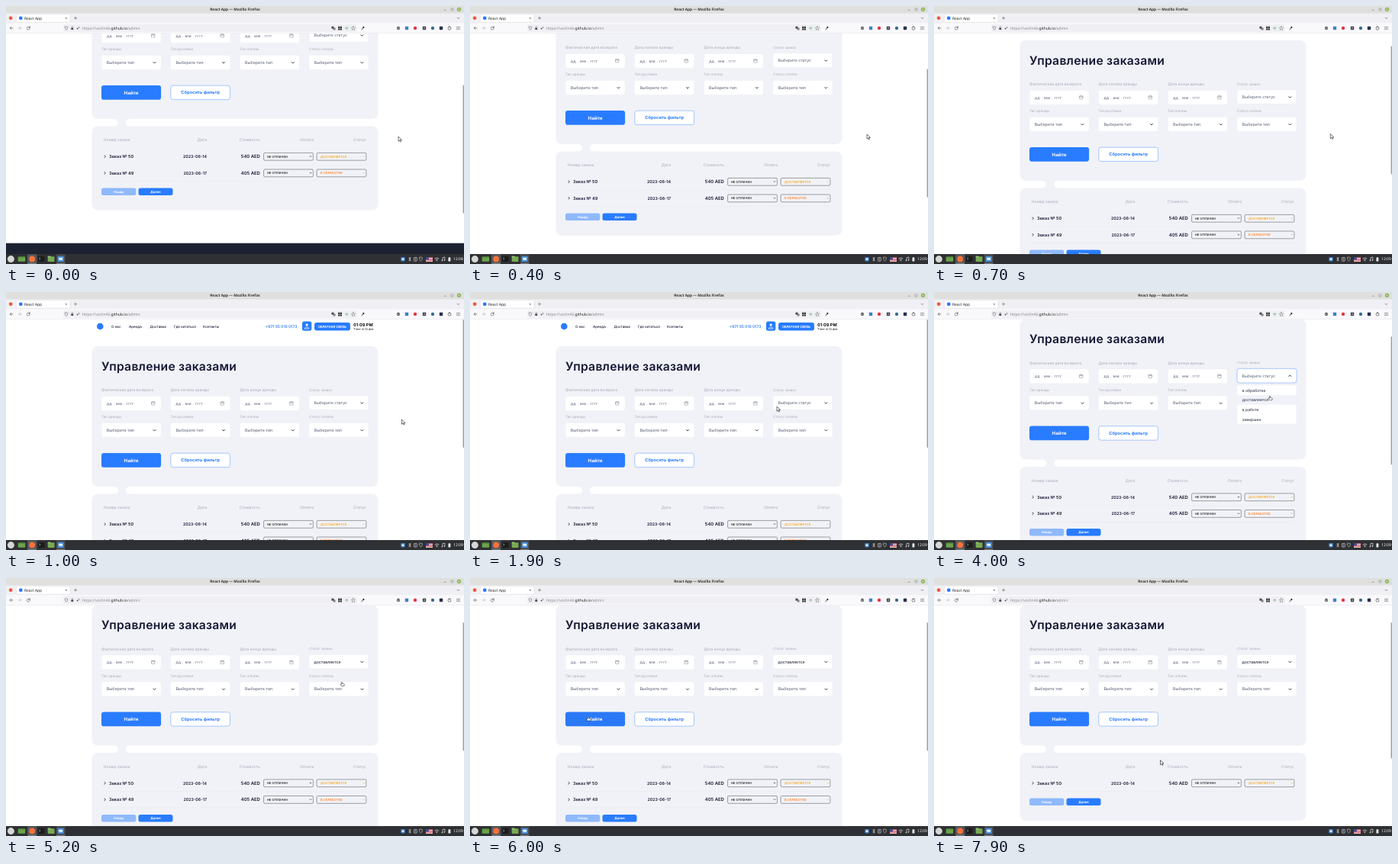
An HTML page that plays this animation: 600 by 338 pixels, repeating every 8000 ms.

```html
<!DOCTYPE html>
<html lang="ru">
<head>
<meta charset="utf-8">
<title>React App</title>
<style>
html, body { margin: 0; width: 100%; height: 100%; overflow: hidden; background: #fff; }
svg { display: block; width: 600px; height: 338px; }
text { font-family: Inter, sans-serif; text-rendering: geometricPrecision; white-space: pre; }
.ui { font-family: "Noto Sans", sans-serif; }
</style>
</head>
<body>
<svg id="stage" viewBox="0 0 600 338"></svg>
<script>
const BLUE = '#297cff', PANEL = '#f1f2f7', INK = '#151834', GREY = '#a6aabb', MID = '#6f7488';
const $ = id => document.getElementById(id);

// Drawing helpers; text is placed by its vertical middle.
const rect = (x, y, w, h, fill, r = 0, extra = '') =>
  `<rect x="${x}" y="${y}" width="${w}" height="${h}" rx="${r}" fill="${fill}" ${extra}/>`;
const dot = (x, y, r, fill) => `<circle cx="${x}" cy="${y}" r="${r}" fill="${fill}"/>`;
const text = (x, y, s, size, fill, weight = 400, anchor = 'start', extra = '') =>
  `<text x="${x}" y="${y + size * 0.36}" font-size="${size}" fill="${fill}" font-weight="${weight}" text-anchor="${anchor}" ${extra}>${s}</text>`;
const line = (d, color, w = 0.8, extra = '') =>
  `<path d="${d}" fill="none" stroke="${color}" stroke-width="${w}" stroke-linecap="round" stroke-linejoin="round" ${extra}/>`;
const chevron = (x, y, size, color, w = 0.9) =>
  line(`M${x - size} ${y - size / 2}l${size} ${size} ${size} ${-size}`, color, w);
const group = (id, body, extra = '') => `<g id="${id}" ${extra}>${body}</g>`;

const COLS = [125, 215.6, 306.25, 396.9];
const field = (x, y) => rect(x, y, 78.1, 18.75, '#fff', 3.1, 'stroke="#e8eaf1" stroke-width=".3"');

function dateField(x) {
  return field(x, 136.5) +
    text(x + 7, 146.2, 'дд . мм . гггг', 4.9, MID, 500, 'start', 'letter-spacing=".35"') +
    rect(x + 65.5, 144, 4.4, 4, 'none', 0.5, `stroke="${MID}" stroke-width=".45"`) +
    line(`M${x + 65.5} 145.2h4.4M${x + 66.6} 143.4v.8M${x + 68.8} 143.4v.8`, MID, 0.45);
}

function selectField(x) {
  return field(x, 171.5) + text(x + 6.8, 180.9, 'Выберите тип', 5.3, MID, 500) +
    chevron(x + 69.5, 181.3, 1.5, '#333748', 1);
}

function siteHeader() {
  const nav = [[138, 'О нас'], [161, 'Аренда'], [188.5, 'Доставка'], [220, 'Где кататься'], [258, 'Контакты']];
  return dot(123.3, 45, 4.3, BLUE) +
    nav.map(([x, s]) => text(x, 45.2, s, 4.5, INK, 500)).join('') +
    text(340, 45.2, '+971 55 010 0173', 5, BLUE, 600) +
    rect(388, 38.5, 12.3, 12.3, BLUE, 2.5) +
    dot(394.1, 43, 1.5, '#fff') + line('M391.2 47.7c.6-2.6 5.2-2.6 5.8 0z', '#fff', 0.7) +
    rect(404, 40, 47, 10.5, BLUE, 3) + text(427.5, 45.3, 'ОБРАТНАЯ СВЯЗЬ', 4.1, '#fff', 700, 'middle') +
    text(455, 43, '01:09 PM', 5.6, '#111', 700) + text(455, 49, 'Time in Dubai', 4.1, '#222');
}

function filterPanel() {
  const top = ['Фактическая дата возврата', 'Дата начала аренды', 'Дата конца аренды'];
  const low = ['Тип аренды', 'Тип доставки', 'Тип оплаты', 'Статус оплаты'];
  return rect(112.5, 71, 375, 184, PANEL, 8) +
    text(125, 97.3, 'Управление заказами', 15.7, INK, 600, 'start', 'letter-spacing=".25"') +
    top.map((s, i) => text(COLS[i], 128.3, s, 5, GREY) + dateField(COLS[i])).join('') +
    text(COLS[3], 128, 'Статус заказа', 4.4, GREY) +
    low.map((s, i) => text(COLS[i], 163.8, s, 4.5, GREY) + selectField(COLS[i])).join('') +
    rect(COLS[3], 135.8, 78.1, 18.75, '#fff', 3.1, 'id="statusBox" stroke-width=".6"') +
    text(403.5, 145.3, '', 5.2, MID, 500, 'start', 'id="statusText"') +
    group('statusArrow', chevron(0, 0.2, 1.5, '#333748', 1)) +
    rect(125, 211, 78.1, 18.75, BLUE, 3.1, 'id="find"') + text(164, 220.4, 'Найти', 6.1, '#fff', 700, 'middle') +
    rect(215.8, 211.2, 77.8, 18.4, '#fff', 3, `stroke="${BLUE}" stroke-width=".4"`) +
    text(254.7, 220.4, 'Сбросить фильтр', 5.75, BLUE, 700, 'middle');
}

function orderRow(y, number, date, price, status, color) {
  const box = x => rect(x, y - 4.8, 64.8, 9.8, 'none', 1.4, 'stroke="#33343c" stroke-width=".45"');
  return line(`M128.9 ${y - 1.5}l1.5 1.5-1.5 1.5`, INK, 0.8) +
    text(135, y, 'Заказ № ' + number, 5.6, INK, 600) +
    text(263, y, date, 5.3, INK, 600, 'end') + text(332.8, y, price, 5.9, INK, 600, 'end') +
    box(337.6) + text(342, y + 0.2, 'НЕ ОПЛАЧЕН', 4.05, '#111', 500) + chevron(399, y, 0.9, '#222', 0.7) +
    box(407.1) + text(412, y + 0.2, status, 4.15, color, 500) + chevron(468.8, y, 0.7, color, 0.5);
}

function ordersPanel() {
  const heads = [[263, 'Дата'], [332.8, 'Стоимость'], [402.8, 'Оплата'], [472, 'Статус']];
  return rect(140, 254.5, 24, 11, PANEL) +
    rect(112, 255, 35, 9.5, '#fff', 4.7) + rect(112, 255, 10, 9.5, '#fff') +
    rect(157, 255, 331, 9.5, '#fff', 4.7) + rect(478, 255, 10, 9.5, '#fff') +
    rect(112.5, 264.5, 375, 110, PANEL, 8, 'id="orders"') +
    text(127.8, 282.6, 'Номер заказа', 5.1, GREY) +
    heads.map(([x, s]) => text(x, 282.6, s, 5.1, GREY, 400, 'end')).join('') +
    orderRow(304.2, 50, '2023-06-14', '540 AED', 'ДОСТАВЛЯЕТСЯ', '#f2a31b') +
    line('M128 315h344', '#e3e5ee', 0.4) +
    group('secondRow', orderRow(325.8, 49, '2023-06-17', '405 AED', 'В ОБРАБОТКЕ', '#ff7d1a') +
      line('M128 336.6h344', '#e3e5ee', 0.4)) +
    group('pager', rect(125, 345.6, 45.3, 9.4, '#8fb9fb', 2.5) + text(147.7, 350.2, 'Назад', 4.1, '#fff', 700, 'middle') +
      rect(173.5, 345.6, 45, 9.4, BLUE, 2.5) + text(196, 350.2, 'Далее', 4.1, '#fff', 700, 'middle'));
}

function dropdown() {
  const options = ['в обработке', 'доставляется', 'в работе', 'завершен'];
  return rect(COLS[3], 157.5, 78.1, 51, '#fff', 2.5, 'stroke="#e6e8f0" stroke-width=".4"') +
    rect(COLS[3], 170.7, 78.1, 12.5, PANEL, 0, 'id="hover"') +
    options.map((s, i) => text(403.7, 164.5 + i * 12.6, s, 5.1, '#3e4358', 500)).join('');
}

function browser() {
  const ui = 'class="ui"', icon = '#45454d';
  const tools = [[514, '#5f636b'], [525, '#3f7fd0'], [536, '#e0344a'], [548, '#2d3038'], [559, '#3f6c8c'], [570, '#27334d']];
  return rect(0, 0, 600, 35.5, '#f9f9fb') + rect(0, 0, 600, 22.3, '#f0f0f4') + rect(0, 0, 600, 9.5, '#dfdfde') +
    text(300, 4.2, 'React App — Mozilla Firefox', 4.75, '#333', 600, 'middle', ui) +
    line('M574 5.3h2.4', '#666', 0.5) + rect(583, 3, 3, 3, 'none', 0.3, 'stroke="#666" stroke-width=".4"') +
    dot(593.5, 4.5, 2.7, '#8ab85c') + line('M592.6 3.6l1.8 1.8m0-1.8l-1.8 1.8', '#fff', 0.5) +
    dot(6.2, 15.8, 2.4, '#f0593a') +
    rect(13.5, 10.8, 70.5, 10.4, '#fff', 1.5, 'stroke="#d4d4dc" stroke-width=".4"') +
    dot(19.3, 15.9, 2.4, BLUE) + text(24, 15.8, 'React App', 4.9, '#222', 400, 'start', ui) +
    line('M78 15l1.8 1.8m0-1.8l-1.8 1.8M89.4 15.8h3.4m-1.7-1.7v3.4', icon, 0.5) + chevron(592.5, 16, 1.4, icon, 0.6) +
    line('M0 35.6h600', '#dcdce2', 0.4) +
    line('M9.2 29H5.2m1.8-1.8l-1.8 1.8 1.8 1.8', icon, 0.6) + line('M16 29h4m-1.8-1.8l1.8 1.8-1.8 1.8', '#b2b2b8', 0.6) +
    line('M31.2 28.3a2 2 0 1 0 .1 1.4M31.3 26.8v1.5h-1.5', icon, 0.6) +
    rect(75, 24, 385, 10, '#f0f0f4', 1.5) +
    line('M79 26.9l1.8.6c0 1.9-.5 3-1.8 3.7-1.3-.7-1.8-1.8-1.8-3.7z', icon, 0.5) +
    rect(85.3, 28.7, 2.9, 2.4, icon, 0.4) + line('M86 28.5v-.7a.8 .8 0 0 1 1.6 0v.7', icon, 0.5) +
    dot(93.6, 29.6, 0.9, icon) + line('M94.3 29.1l1.8-1.6m-.6.5l.7.6', icon, 0.5) +
    text(100, 28.8, 'https://vorlin46.<tspan fill="#222">github.io</tspan>/admin', 5, '#85858c', 400, 'start', ui) +
    rect(426.5, 26.7, 3, 3, icon, 0.4) + rect(428.6, 28.5, 3, 3, '#7d7d85', 0.4) +
    [435.2, 437.8].map(x => [26.8, 29.4].map(y => rect(x, y, 2.1, 2.1, '#222')).join('')).join('') +
    dot(446.3, 29, 2.3, '#c9dfd2') + line('M445.2 29h2.2', '#619a78', 0.6) +
    line('M455 26.5l.8 1.7 1.8.2-1.3 1.3.3 1.8-1.6-.9-1.6.9.3-1.8-1.3-1.3 1.8-.2z', icon, 0.4) +
    line('M465.8 30.8l2.6-2.6', '#222', 0.9) + dot(468.4, 28.1, 1.1, '#222') +
    tools.map(([x, c], i) => i % 2 ? rect(x - 2.2, 26.8, 4.4, 4.4, c, 0.8) : dot(x, 29, 2.2, c)).join('') +
    line('M512.8 28.9l1 1 1.6-1.8', '#fff', 0.5) + line('M546.8 29h2.4M548 27.8v2.4', '#f9f9fb', 0.5) +
    rect(579.2, 27.5, 3.5, 3.5, 'none', 0.5, `stroke="${icon}" stroke-width=".6"`) + dot(581, 27.2, 0.8, icon) +
    line('M590.3 27.4h4.4M590.3 29h4.4M590.3 30.6h4.4', icon, 0.45);
}

function taskbar() {
  const flag = [0, 1, 2, 3].map(i => rect(550, 329 + i * 1.5, 9, 0.8, '#d5364a')).join('');
  return rect(0, 325, 600, 13, '#2e3033') + dot(6.4, 331.6, 4.5, '#d6d8d6') +
    rect(15.8, 328.2, 9.4, 6.6, '#6ba44a', 0.8) + rect(15.8, 328.2, 9.4, 1.4, '#4c7b37') +
    rect(28, 325.3, 12.4, 12.5, '#55585c', 1) + dot(34.2, 331.4, 3.9, '#f4713c') +
    rect(42.2, 328, 8.2, 7, '#1b1c1e', 0.8) + line('M43.8 330l1.2 1-1.2 1', '#ddd', 0.6) +
    rect(54.7, 328.2, 8.8, 6.8, '#79a953', 0.8) + rect(54.7, 327.4, 4, 2, '#93bd70', 0.5) +
    rect(65.7, 325.3, 12, 12.5, '#484b50', 1) + rect(67.7, 327.8, 8, 7.2, '#4a90dc', 0.8) + rect(69.3, 329.8, 4.8, 3, '#e8f1fb', 0.4) +
    line('M29 337.4h10.4M66.5 337.4h10.4', '#a9adb0', 0.6) +
    rect(517.3, 329, 5.4, 5.4, '#3f85d8', 0.8) + rect(518.6, 330.6, 2.8, 2.2, '#fff') +
    line('M527.6 330.2l2.8 2.7-1.4 1.4v-5.2l1.4 1.3-2.8 2.7', '#e4e4e4', 0.6) +
    rect(534.4, 329.4, 4, 4.8, 'none', 0.5, 'stroke="#ddd" stroke-width=".6"') + line('M536.4 330.2v3', '#ddd', 0.6) +
    line('M543.4 329l2 .7c0 2.3-.7 3.5-2 4.5-1.3-1-2-2.2-2-4.5z', '#ddd', 0.6) +
    rect(550, 329, 9, 6, '#f2f2f2') + flag + rect(550, 329, 4, 3.2, '#39538f') +
    line('M561.9 330.8q2.5-2.2 5 0M563 332.2q1.4-1.2 2.8 0', '#e4e4e4', 0.7) + dot(564.4, 333.6, 0.7, '#e4e4e4') +
    line('M571.9 333.4v-3.8l3-.6v3.8', '#e4e4e4', 0.7) + dot(571.3, 333.5, 0.8, '#e4e4e4') + dot(574.3, 333, 0.8, '#e4e4e4') +
    rect(579.4, 329.6, 3, 5, '#e4e4e4', 0.4) + rect(580.2, 329, 1.4, 0.8, '#e4e4e4') +
    text(598.8, 331.6, '', 5, '#fff', 500, 'end', 'class="ui" id="clock"');
}

const arrow = '<path d="M0 0v6.2l1.5-1.3 1 2.1 1-.5-1-2h2z" fill="#fff" stroke="#15151a" stroke-width=".6" stroke-linejoin="round"/>';
const hand = '<path d="M-.6 0c.6-.5 1.1 0 1.1.5v1.7l2.6.5c.6.2.8.6.8 1.1l-.4 2.2H-.3L-2 3.7c-.3-.7.4-1 .8-.5l.4.4V.5z" fill="#fff" stroke="#15151a" stroke-width=".6" stroke-linejoin="round" transform="scale(.85)"/>';

$('stage').innerHTML = rect(0, 0, 600, 338, '#fff') +
  group('page', siteHeader() + filterPanel() + ordersPanel() + group('options', dropdown()) + rect(0, 417.7, 600, 60, '#1d2230')) +
  rect(598.6, 36, 1.4, 168, '#9c9ca0', 0.7, 'id="thumb"') +
  browser() + taskbar() + group('cursor', group('arrow', arrow) + group('hand', hand));

// Keys are [time, values...], eased between neighbours.
const SCROLL = [[100, 107], [400, 74], [900, 0], [1900, 0], [2200, 35.5]];
const POINTER = [[0, 514, 171], [400, 520, 168], [1000, 518.5, 167], [1400, 518.5, 167], [1900, 402, 150],
  [2200, 390, 140.5], [2700, 438, 109], [3100, 438, 109], [3600, 440, 136.5], [5200, 440, 136.5], [6000, 154.5, 182],
  [6800, 154.5, 182], [7200, 320, 280], [7400, 337, 269], [7600, 337, 269], [7900, 296.5, 238.5]];

function sample(keys, t) {
  const next = keys.findIndex(k => k[0] > t);
  if (next < 0) return keys[keys.length - 1].slice(1);
  if (next === 0) return keys[0].slice(1);
  const a = keys[next - 1], b = keys[next];
  const p = (t - a[0]) / (b[0] - a[0]), e = p * p * (3 - 2 * p);
  return a.slice(1).map((v, i) => v + (b[i + 1] - v) * e);
}

const set = (id, attrs) => Object.entries(attrs).forEach(([k, v]) => $(id).setAttribute(k, v));
const show = (id, on) => set(id, { visibility: on ? 'visible' : 'hidden' });

function draw(t) {
  const [scroll] = sample(SCROLL, t), [x, y] = sample(POINTER, t);
  const open = t >= 2900 && t < 4500, chosen = t >= 4500, filtered = t >= 6300;
  const pointing = t >= 2100 && t < 6900;

  set('page', { transform: `translate(0 ${-scroll})` });
  set('thumb', { y: 36 + scroll * 0.63, height: filtered ? 178 : 168 });
  $('clock').textContent = t < 200 ? '12:08' : '12:09';

  show('options', open);
  show('hover', open && t >= 3400);
  set('statusBox', { stroke: open ? '#6ea5fb' : '#e8eaf1' });
  set('statusArrow', { transform: `translate(466.3 145.4) scale(1 ${open ? -1 : 1})` });
  set('statusText', { fill: chosen ? '#2d3146' : MID });
  $('statusText').textContent = chosen ? 'доставляется' : 'Выберите статус';

  set('find', { fill: t >= 5900 && t < 6900 ? '#2a79f6' : BLUE });
  show('secondRow', !filtered);
  set('orders', { height: filtered ? 89 : 110 });
  set('pager', { transform: `translate(0 ${filtered ? -21.6 : 0})` });

  set('cursor', { transform: `translate(${x} ${y})` });
  show('arrow', !pointing);
  show('hand', pointing);
}

function tick() {
  draw(Math.floor(performance.now() % 8000 / 100) * 100);
  requestAnimationFrame(tick);
}
tick();
</script>
</body>
</html>
```
